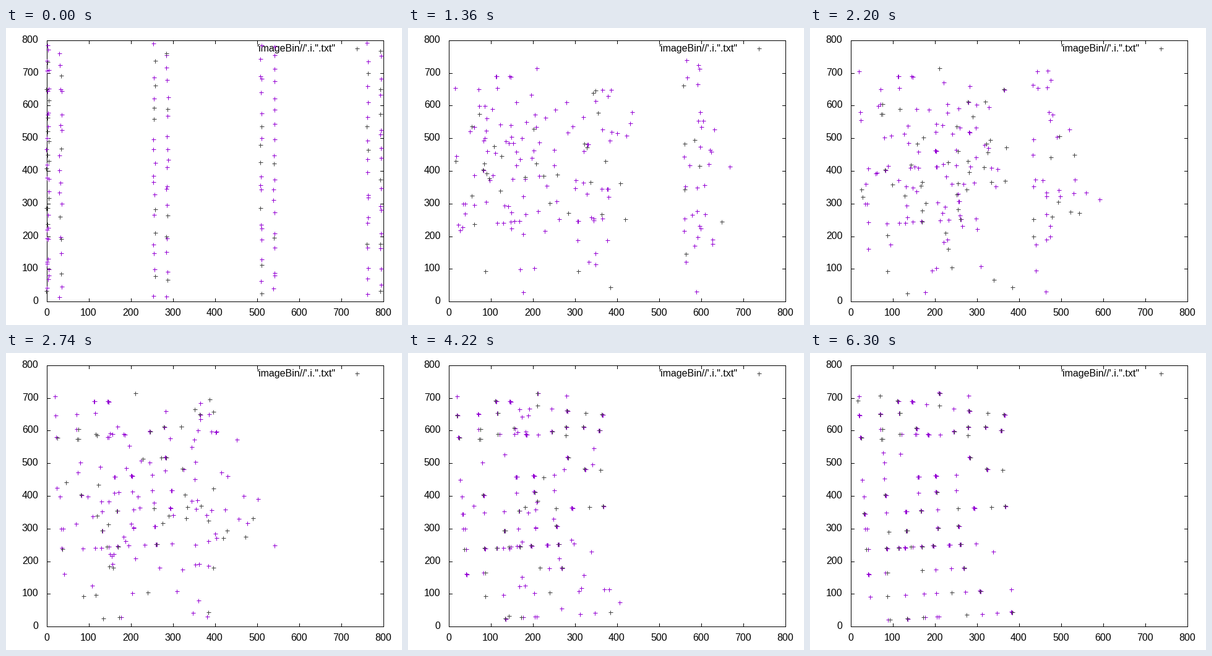
Animation, 640 px wide and 480 px high, one loop 7980 ms. Source, as a matplotlib script:

```python
import numpy as np
import matplotlib.pyplot as plt
from matplotlib.animation import FuncAnimation
from matplotlib.collections import LineCollection

W, H, DPI = 640, 480, 100
PX = 72 / DPI                      # one pixel in points
LEFT, RIGHT, TOP, BOTTOM = 65, 609, 19, 441
FRAMES, INTERVAL = 399, 20
SPEED, LAST_STEP = 3, 315
PURPLE, DARK = "#9400d3", "#444444"

plt.rcParams["font.family"] = "Liberation Sans"
rng = np.random.default_rng(12)

# Resting rows: height at the left and right end, x of single crosses,
# of pairs and of tight clumps
ROWS = [
    (704, 706, [20, 71, 281], [], []),
    (713, 713, [], [], [212]),
    (690, 688, [18], [], [113, 147]),
    (678, 675, [181, 212], [], []),
    (665, 647, [245, 327], [], [282, 366]),
    (646, 652, [], [], [21, 71, 117]),
    (603, 610, [], [74], [157, 280, 321]),
    (596, 599, [], [], [246, 359]),
    (588, 584, [213, 280], [120, 156], [185]),
    (578, 573, [], [75], [25]),
    (530, 516, [78, 119], [], [284]),
    (500, 477, [81, 362], [], [325]),
    (448, 463, [28, 81, 252], [], [162, 203]),
    (396, 415, [32, 162, 252], [], [84, 204]),
    (344, 367, [85, 207, 256, 336], [], [34, 132, 168, 294, 368]),
    (297, 288, [91], [38], []),
    (292, 306, [], [], [134, 208, 257]),
    (234, 253, [299], [40, 146], [87, 115, 130, 170, 197, 235, 262]),
    (227, 227, [340], [], []),
    (159, 178, [171, 203, 240], [86], [43, 270]),
    (89, 112, [47, 88, 131, 175, 204, 241, 273, 383], [], [309]),
    (19, 42, [277, 313, 348], [92, 176, 208], [136, 384]),
]
SPREADS = ([(0, 0)], [(-2, 0.3), (2, 0.3)], [(-1, 0.8), (0, 0), (1.3, -0.8)])


def make_goals():
    pts = []
    for a, b, *groups in ROWS:
        xs = sum(groups, [])
        ends = [min(xs), max(xs)]
        for group, spread in zip(groups, SPREADS):
            pts += [(x + dx, np.interp(x, ends, [a, b]) + dy)
                    for x in group for dx, dy in spread]
    return np.array(pts)


def make_starts(total):
    """Four double columns, the first of them twice as dense."""
    pts = []
    for i, part in enumerate(np.array_split(np.arange(total), 9)):
        k, side = divmod(max(i - 1, 0), 2)
        n = len(part)
        x = 3 + 31 * side + 253.6 * k + rng.uniform(-1, 1, n) * (3.5 - 0.7 * k)
        y = 5 + (np.arange(n) + rng.uniform(0, 1, n)) * 790 / n
        pts.append(np.column_stack([x, y]))
    return np.vstack(pts)


def to_pixels(x, y):
    px = LEFT + np.asarray(x) * (RIGHT - LEFT) / 800
    py = BOTTOM - np.asarray(y) * (BOTTOM - TOP) / 800
    return np.rint(px).astype(int), np.rint(py).astype(int)


goals = make_goals()
starts = rng.permutation(make_starts(len(goals)))
path = goals - starts
dist = np.hypot(*path.T)
speed = np.maximum(SPEED, dist / LAST_STEP)

fig = plt.figure(figsize=(W / DPI, H / DPI), dpi=DPI, facecolor="white")
ax = fig.add_axes([0, 0, 1, 1])
ax.set_xlim(0, W)
ax.set_ylim(H, 0)
ax.axis("off")


def label(x, y, text, ha):
    ax.text(x, y, text, ha=ha, va="baseline", fontsize=16 * PX, color="black")


def draw_frame():
    l, r, t, b = LEFT + 0.5, RIGHT + 0.5, TOP + 0.5, BOTTOM + 0.5
    segs = [[(l, t), (r, t)], [(l, b), (r, b)], [(l, t), (l, b)], [(r, t), (r, b)]]
    for v in range(0, 801, 100):
        px, py = to_pixels(v, v)
        x, y = px + 0.5, py + 0.5
        segs += [[(x, b), (x, b - 5)], [(x, t), (x, t + 5)],
                 [(l, y), (l + 5, y)], [(r, y), (r - 5, y)]]
        label(x, 465, str(v), "center")
        label(52.5, py + 5, str(v), "right")
    ax.add_collection(LineCollection(segs, colors="black", linewidths=PX,
                                     antialiaseds=False, capstyle="projecting"))
    label(532, 38, "'imageBin//'.i.\".txt\"", "right")


def crosses(color):
    return ax.plot([], [], "+", color=color, ms=7 * PX, mew=PX,
                   antialiased=False, zorder=3)[0]


draw_frame()
bright, dim = crosses(PURPLE), crosses(DARK)


def update(n):
    done = np.minimum(1, n * speed / np.maximum(dist, 1e-6))
    px, py = to_pixels(*(starts + path * done[:, None]).T)
    px, py = np.append(px, 567), np.append(py, 33)   # legend key
    odd = (px % 2 == 1) & (py % 2 == 1)              # odd pixels lose their hue
    bright.set_data(px[~odd], py[~odd])
    dim.set_data(px[odd], py[odd])
    return bright, dim


anim = FuncAnimation(fig, update, frames=FRAMES, interval=INTERVAL,
                     init_func=lambda: update(0), repeat=True, repeat_delay=0,
                     blit=True)
plt.show()
```
